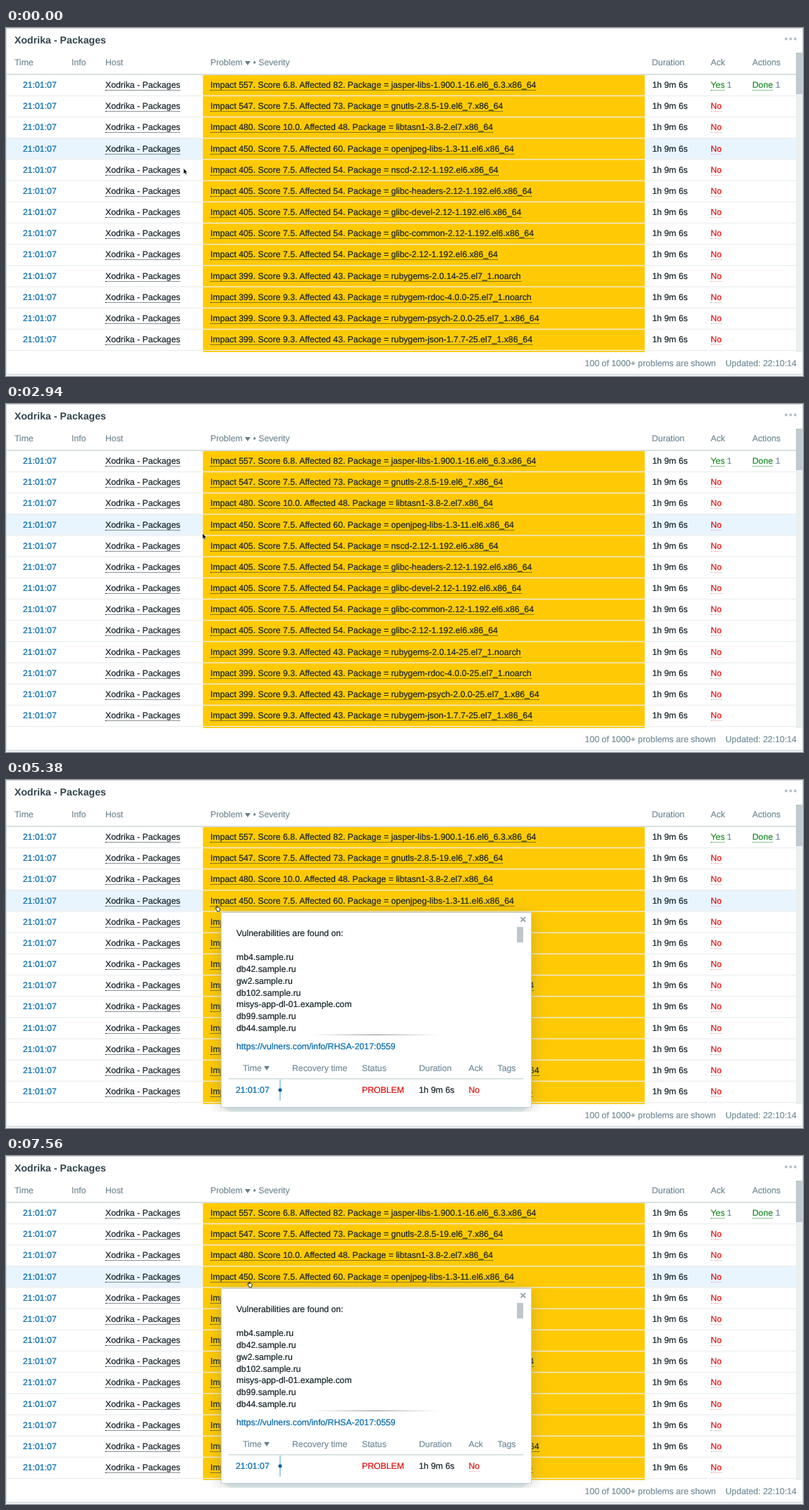
An HTML page for the animation above (8000 ms loop, 1131x495 px).

```html
<!DOCTYPE html>
<html lang="en">
<head>
<meta charset="utf-8">
<title>Problems widget</title>
<style>
  html, body { margin: 0; width: 100%; height: 100%; overflow: hidden; background: #eef1f3; }
  #stage {
    position: absolute; left: 0; top: 0; width: 1131px; height: 495px; overflow: hidden;
    font: 12.27px/14px "Liberation Sans", Arial, sans-serif; color: #17242b;
    text-rendering: geometricPrecision; -webkit-text-stroke: .22px currentColor;
  }
  #stage > *, #stage div, #stage span, #stage svg { position: absolute; box-sizing: border-box; }
  #frame { left: 0; top: 0; width: 1131px; height: 493px; background: #fff; border: 1px solid #ccd5d9; }
  span { white-space: pre; }
  .title { font-size: 14.18px; line-height: 16px; font-weight: bold; color: #33444e; -webkit-text-stroke: 0; }
  .head { color: #768d99; }
  .link { color: #0269ad; }
  .red { color: #e00f0f; }
  .green { color: #1d8f2a; }
  .dotted { border-bottom: 1px dotted currentColor; }
  .soft { border-bottom: 1px dotted #e9a0a0; }
  .sort { width: 0; height: 0; border: 4px solid transparent; border-top: 6px solid #66808d; border-bottom: 0; }
  #table { left: 0; top: 0; width: 1121px; height: 461px; overflow: hidden; }
  #popup { left: 0; top: 0; width: 1131px; height: 472px; overflow: hidden; visibility: hidden; }
  #lip {
    left: 308px; top: 465px; width: 434px; height: 7px; background: linear-gradient(#c3d1d5, #dbe4e6);
    clip-path: polygon(0 0, 100% 0, 97.5% 100%, 2.5% 100%);
  }
  #panel {
    left: 305px; top: 188px; width: 441px; height: 278px; background: #fff;
    border: 1px solid #c5d0d5; box-shadow: 0 4px 20px rgba(125, 132, 110, .42);
  }
  #rule { left: 434px; top: 362px; width: 180px; height: 1px; background: linear-gradient(90deg, transparent, #858b8e, transparent); }
  svg { left: 0; top: 0; overflow: visible; }
</style>
</head>
<body>
<div id="stage">
  <div id="frame"></div>
  <div id="table"><svg></svg></div>
  <div id="chrome"><svg></svg></div>
  <div id="popup">
    <div id="panel"></div>
    <div id="lip"></div>
    <div id="rule"></div>
    <svg><path d="M730.5 195l6.6 6.8m0-6.8l-6.6 6.8" stroke="#9aabb4" stroke-width="2"/></svg>
  </div>
  <svg id="arrow" width="8" height="10">
    <path d="M0 0V8L1.8 6.5 3 9.2 4.5 8.6 3.3 5.9H5.6Z" fill="#000" stroke="#fff" stroke-width=".6"/>
  </svg>
  <svg id="hand" width="8" height="10">
    <path d="M-1.9 6.3-3.3 4.4Q-3.3 3.3-2.2 3.8L-1.6 4.4V1.2Q-1 .2-.4 1.2V3.3Q.3 2.8.8 3.5 1.4 3.1 1.9 3.8 3 3.5 3.2 4.5V6.2L2.5 7.6V8.9H-1V7.7Z"
      fill="#fff" stroke="#111" stroke-width=".9" stroke-linejoin="round"/>
  </svg>
</div>
<script>
const $ = id => document.getElementById(id);
const table = $('table'), chrome = $('chrome'), popup = $('popup');

// Rectangles go into the parent's SVG layer so that edges may fall between pixels
function box(parent, x, y, width, height, fill, rx = 0) {
  const el = document.createElementNS('http://www.w3.org/2000/svg', 'rect');
  for (const [key, value] of Object.entries({ x, y, width, height, fill, rx })) el.setAttribute(key, value);
  parent.querySelector('svg').append(el);
}

function label(parent, x, y, text, cls = '') {
  const el = document.createElement('span');
  el.className = cls;
  el.style.left = x + 'px';
  el.style.top = y + 'px';
  el.textContent = text;
  parent.append(el);
}

function heads(parent, y, cols) {
  for (const [text, x] of Object.entries(cols)) label(parent, x, y, text, 'head');
}

const host = 'Xodrika - Packages';
const problems = [
  [557, '6.8', 82, 'jasper-libs-1.900.1-16.el6_6.3.x86_64'],
  [547, '7.5', 73, 'gnutls-2.8.5-19.el6_7.x86_64'],
  [480, '10.0', 48, 'libtasn1-3.8-2.el7.x86_64'],
  [450, '7.5', 60, 'openjpeg-libs-1.3-11.el6.x86_64'],
  ...['nscd', 'glibc-headers', 'glibc-devel', 'glibc-common', 'glibc']
    .map(name => [405, '7.5', 54, name + '-2.12-1.192.el6.x86_64']),
  ...['gems-2.0.14-25.el7_1.noarch', 'gem-rdoc-4.0.0-25.el7_1.noarch',
      'gem-psych-2.0.0-25.el7_1.x86_64', 'gem-json-1.7.7-25.el7_1.x86_64']
    .map(name => [399, '9.3', 43, 'ruby' + name])
];

// Main table
const pitch = 30.18, hovered = 3;
const rowEnd = i => 95.8 + pitch * i;
box(table, 1, rowEnd(hovered - 1), 1120, pitch, '#e8f4fe');
box(table, 279.5, 66.5, 627, 395, '#ffca05');
box(table, 1, 65, 1120, 2, '#dbe1e4');
problems.forEach(([impact, score, affected, pack], i) => {
  const y = Math.round(74 + pitch * i);
  box(table, 1, rowEnd(i), 1120, 1.3, '#ebeef0');
  label(table, 24, y, '21:01:07', 'link');
  label(table, 141, y, host, 'dotted');
  label(table, 290, y, `Impact ${impact}. Score ${score}. Affected ${affected}. Package = ${pack}`, 'dotted');
  label(table, 917, y, '1h 9m 6s');
  if (i) label(table, 1000, y, 'No', 'red soft');
});
label(table, 1000, 74, 'Yes', 'green dotted');
label(table, 1023, 74, '1', 'head');
label(table, 1059, 74, 'Done', 'green dotted');
label(table, 1092, 74, '1', 'head');

// Widget title, column heads, scrollbar and footer
label(chrome, 12, 10, host, 'title');
heads(chrome, 42, {
  Time: 12, Info: 93, Host: 141, Problem: 290, '• Severity': 350.5,
  Duration: 916.5, Ack: 1000, Actions: 1059
});
label(chrome, 339, 47, '', 'sort');
for (const x of [1105, 1111.5, 1118]) box(chrome, x, 13.5, 4, 4, '#b4c0c7', 2);
box(chrome, 1121, 35, 9, 426, '#eceff0');
box(chrome, 1121, 35, 9, 59, '#c0cacf');
label(chrome, 821.5, 470, '100 of 1000+ problems are shown', 'head');
label(chrome, 1021, 470, 'Updated: 22:10:14', 'head');

// Popup
box(popup, 725, 209, 9, 22, '#bdc7cc');
label(popup, 327, 211, 'Vulnerabilities are found on:');
['mb4.sample.ru', 'db42.sample.ru', 'gw2.sample.ru', 'db102.sample.ru',
 'misys-app-dl-01.example.com', 'db99.sample.ru', 'db44.sample.ru']
  .forEach((name, i) => label(popup, 327, Math.round(245 + 16.85 * i), name));
label(popup, 327, 372, 'https://vulners.com/info/RHSA-2017:0559', 'link');
heads(popup, 403, { Time: 336, 'Recovery time': 406, Status: 505, Duration: 586, Ack: 656.5, Tags: 697.5 });
label(popup, 366, 407, '', 'sort');
box(popup, 316, 424, 418, 2, '#dce3e5');
box(popup, 388, 426, 2, 30, '#a3d0ec');
box(popup, 386.5, 438.5, 5, 5, '#0b5c94', 2.5);
label(popup, 326, 434, '21:01:07', 'link');
label(popup, 505, 434, 'PROBLEM', 'red');
label(popup, 586, 434, '1h 9m 6s');
label(popup, 656.5, 434, 'No', 'red soft');

// Pointer bursts: first step, last step, x of each step, y from, y to
const loop = 8000, popupAt = 4030, handAt = 3210;
const bursts = [
  [0, 0, [252], 199.5],
  [90, 90, [253], 196.5],
  [350, 440, [256, 259.5], 191, 187],
  [1880, 2400, [260, 262, 265, 268, 271, 274, 276], 186, 185],
  [2580, 2580, [277], 185],
  [2940, 3120, [279, 283, 288], 184, 181],
  [3210, 3210, [294.5], 178],
  [3500, 3500, [295], 178],
  [3680, 3760, [296, 295.5], 178],
  [5380, 5380, [300.5], 178],
  [5530, 6330, [302, 307, 315, 326, 337, 345, 349, 346, 338, 326], 178],
  [6410, 6840, [314.5, 306, 300, 297, 295, 294], 178],
  [7020, 7560, [296, 302, 312, 324, 334, 342, 346], 178]
];
const path = bursts.flatMap(([from, to, xs, y0, y1 = y0]) => xs.map((x, i) => {
  const k = xs.length > 1 ? i / (xs.length - 1) : 0;
  return { at: Math.round((from + (to - from) * k) / 10) * 10, x, y: y0 + (y1 - y0) * k };
}));

const start = performance.now();
function draw() {
  const t = (performance.now() - start) % loop;
  const pos = path.findLast(p => p.at <= t) || path[0];
  const isHand = t >= handAt;
  $('hand').style.visibility = isHand ? 'visible' : 'hidden';
  $('arrow').style.visibility = isHand ? 'hidden' : 'visible';
  $(isHand ? 'hand' : 'arrow').style.transform = `translate(${pos.x}px, ${pos.y}px)`;
  popup.style.visibility = t >= popupAt ? 'visible' : 'hidden';
  requestAnimationFrame(draw);
}
draw();
</script>
</body>
</html>
```
